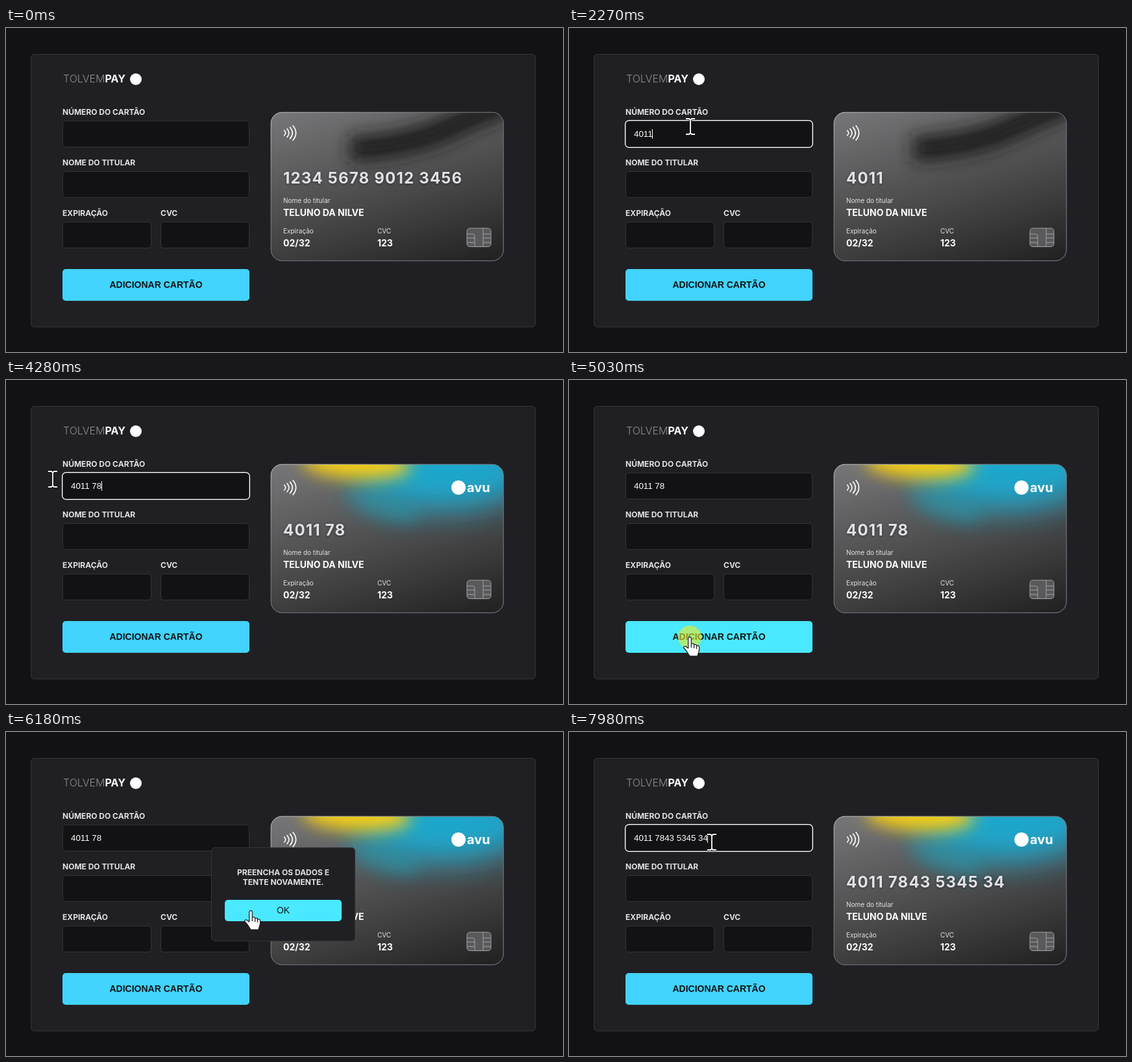
Write an HTML page that moves like this. It is 858x500 px and loops after 8 s.

```html
<!DOCTYPE html>
<html lang="pt-BR">
<head>
<meta charset="utf-8">
<title>Adicionar cartão</title>
<style>
  html, body { margin: 0; width: 100%; height: 100%; overflow: hidden; background: #121214; }
  svg { display: block; width: 100%; height: 100%; }
  text { font-family: Inter, sans-serif; fill: #e1e1e6; white-space: pre; }
  .label { font-size: 12px; font-weight: 700; }
  .small { font-size: 10px; }
  .value { font-size: 14px; font-weight: 700; fill: #fff; }
  .number { font-size: 24px; font-weight: 700; letter-spacing: 1.2px; filter: drop-shadow(0 1px 2px #0006); }
  .control { font-family: "Liberation Sans", Arial, sans-serif; font-size: 14px; fill: #121214; text-anchor: middle; }
  .typed { font-family: "Liberation Sans", Arial, sans-serif; font-size: 13.333px; fill: #fff; }
  .field { fill: #121214; stroke: #323238; }
  .panel { fill: #202024; stroke: #323238; }
  .button { fill: #42d3ff; }
  .button.hover { fill: #4ae9ff; }
  .line { fill: none; stroke: #fff; stroke-width: 1.6; stroke-linecap: round; }
  .pointer { fill: #fff; stroke: #17171a; stroke-width: 1.2; stroke-linejoin: round; }
</style>
</head>
<body>
<svg id="stage" viewBox="0 0 858 500">
  <defs>
    <linearGradient id="metal" gradientUnits="userSpaceOnUse" x1="408" y1="130" x2="505" y2="458">
      <stop stop-color="#777779"/><stop offset=".55" stop-color="#464647"/><stop offset="1" stop-color="#1a1a1b"/>
    </linearGradient>
    <linearGradient id="edge" x1="0" y1="0" x2="1" y2="1">
      <stop stop-color="#c4c4c8"/><stop offset=".3" stop-color="#85858c"/>
      <stop offset=".6" stop-color="#74747c"/><stop offset="1" stop-color="#88888e"/>
    </linearGradient>
    <clipPath id="cardShape"><rect x="408" y="130" width="358.5" height="229.5" rx="17"/></clipPath>
    <filter id="soft" x="-50%" y="-100%" width="200%" height="300%"><feGaussianBlur stdDeviation="13"/></filter>
    <filter id="softer" x="-50%" y="-100%" width="200%" height="300%"><feGaussianBlur stdDeviation="24"/></filter>
  </defs>

  <rect width="858" height="500" fill="#121214"/>
  <rect class="panel" x="38.5" y="40.5" width="777" height="421" rx="5"/>
  <text x="88" y="84" font-size="16" font-weight="300" style="fill:#8d8d93">TOLVEM<tspan font-weight="700" fill="#fff">PAY</tspan></text>
  <circle cx="200" cy="79" r="9" fill="#fff"/>

  <g id="form"></g>
  <rect id="ring" x="86.6" y="142.6" width="288.8" height="41.8" rx="6" fill="none" stroke="#fff" stroke-width="1.3"/>
  <text id="typed" class="typed" x="100" y="168"></text>
  <rect id="caret" y="156" width="1" height="15" fill="#fff"/>
  <rect id="add" class="button" x="87" y="372" width="288" height="49" rx="5"/>
  <text class="control" x="231" y="401" font-weight="700">ADICIONAR CARTÃO</text>

  <g clip-path="url(#cardShape)">
    <rect x="408" y="130" width="359" height="230" fill="url(#metal)"/>
    <path id="shade" d="M530 187Q620 183 680 155T785 112" fill="none" stroke="#1b1b1c" stroke-width="38" filter="url(#soft)"/>
    <g id="glow">
      <ellipse cx="672" cy="138" rx="138" ry="62" fill="#1ba6cb" filter="url(#softer)"/>
      <ellipse cx="582" cy="192" rx="58" ry="24" fill="#2797aa" opacity=".55" transform="rotate(18 582 192)" filter="url(#soft)"/>
      <ellipse cx="540" cy="128" rx="84" ry="25" fill="#f3cb12" transform="rotate(3 540 128)" filter="url(#soft)"/>
    </g>
  </g>
  <rect x="408.2" y="130.2" width="358" height="229" rx="17" fill="none" stroke="url(#edge)"/>
  <g id="waves"></g>
  <g id="brand">
    <circle cx="697" cy="166" r="11" fill="#fff"/>
    <text x="710" y="173" font-size="20" font-weight="700" style="fill:#fff">avu</text>
  </g>
  <text id="number" class="number" x="427" y="240"></text>
  <g id="details"></g>
  <g fill="#59595b" stroke="#a2a2a5">
    <rect x="710" y="309" width="37" height="28.5" rx="4.5"/>
    <path fill="none" d="M710 318H719Q722 318 722 321V337M710 324H722M710 331H722M735 309V337M735 318H747M735 324H747M735 331H747"/>
  </g>

  <g id="modal">
    <rect class="panel" x="316.5" y="178.5" width="221" height="144" rx="5"/>
    <g text-anchor="middle">
      <text class="label" x="427" y="221">PREENCHA OS DADOS E</text>
      <text class="label" x="427" y="236">TENTE NOVAMENTE.</text>
    </g>
    <rect id="ok" class="button" x="337" y="259" width="180" height="33" rx="5"/>
    <text class="control" x="427" y="280">OK</text>
  </g>

  <g id="cursor">
    <circle id="halo" r="18" fill="#f2ee1c" opacity=".58"/>
    <g id="beam" fill="none">
      <path id="beamPath" d="M-7-12H-2L0-10 2-12H7M0-10V10M-7 12H-2L0 10 2 12H7" stroke="#111" stroke-width="3.4"/>
      <use href="#beamPath" style="stroke:#fff"/>
      <path d="M-7-12H-2L0-10 2-12H7M0-10V10M-7 12H-2L0 10 2 12H7" stroke="#fff" stroke-width="1.8"/>
    </g>
    <path id="arrow" class="pointer" d="M0 0V17L4 13.5 7 20 10 18.7 7 12.3H12.3Z"/>
    <path id="hand" class="pointer" d="M-2.3 2A2.3 2.3 0 0 1 2.3 2V10Q6 8.8 6.6 11.5 10 10.4 10.6 13 14.6 12.2 14.6 16V20L12 29H0L-4.5 22-9.5 16Q-9 12.6-5.5 14.6L-2.3 17ZM2.3 10V16M6.6 11.5V17M10.6 13V18"/>
  </g>
</svg>
<script>
const LOOP = 8000, BLINK = 535;
const $ = id => document.getElementById(id);

const field = (label, x, y, width) =>
  `<text class="label" x="${x}" y="${y - 9}">${label}</text>
   <rect class="field" x="${x + .5}" y="${y + .5}" width="${width - 1}" height="40" rx="5"/>`;
const detail = (label, value, x, y) =>
  `<text class="small" x="${x}" y="${y}">${label}</text>
   <text class="value" x="${x}" y="${y + 20}">${value}</text>`;

$('form').innerHTML = field('NÚMERO DO CARTÃO', 87, 143, 288) + field('NOME DO TITULAR', 87, 221, 288) +
  field('EXPIRAÇÃO', 87, 299, 137) + field('CVC', 238, 299, 137);
$('details').innerHTML = detail('Nome do titular', 'TELUNO DA NILVE', 427, 270) +
  detail('Expiração', '02/32', 427, 317) + detail('CVC', '123', 572, 317);
$('waves').innerHTML = [0, 1, 2, 3].map(i => {
  const x = 428.5 + 4.5 * i, h = 4 + 2.4 * i, bulge = 4.4 + 1.6 * i;
  return `<path class="line" d="M${x} ${162 - h}Q${x + bulge} 162 ${x} ${162 + h}"/>`;
}).join('');

// Pointer stops: time, x, y, shape
const moves = [
  [130, 690, 484, 'arrow'], [200, 640, 462, 'arrow'], [270, 570, 425, 'arrow'], [340, 490, 375, 'arrow'],
  [420, 415, 315, 'arrow'], [500, 345, 262, 'arrow'], [580, 285, 212, 'arrow'], [660, 240, 172, 'beam'],
  [730, 208, 150, 'beam'], [800, 192, 147, 'beam'], [880, 187, 153, 'beam'], [1000, 187, 152, 'beam'],
  [4280, 72, 153, 'beam'], [4350, 42, 176, 'arrow'], [4420, 38, 225, 'arrow'], [4480, 48, 275, 'arrow'],
  [4550, 70, 320, 'arrow'], [4620, 100, 358, 'arrow'], [4690, 135, 385, 'hand'], [4750, 163, 395, 'hand'],
  [4820, 180, 397, 'hand'], [4890, 186, 397, 'hand'],
  [5690, 196, 394, 'hand'], [5750, 218, 386, 'arrow'], [5820, 246, 370, 'arrow'], [5890, 281, 347, 'arrow'],
  [5960, 317, 323, 'arrow'], [6030, 347, 303, 'arrow'], [6100, 367, 287, 'hand'], [6180, 377, 276, 'hand'],
  [6250, 380, 276, 'hand'], [6450, 380, 276, 'arrow'], [6520, 372, 268, 'arrow'], [6590, 346, 246, 'beam'],
  [6650, 310, 220, 'arrow'], [6720, 270, 194, 'arrow'], [6790, 238, 178, 'beam'], [6860, 220, 170, 'beam']
].map(([at, x, y, shape]) => [at, { x, y, shape }]);

const type = (at, text) => [at, { text, caretAt: at }];
const events = [
  [880, { focus: true, caretAt: 880 }],
  type(1880, '4'), type(1940, '40'), type(2140, '401'), type(2270, '4011'),
  type(3140, '4011 7'), type(3210, '4011 78'), [3210, { glow: true }], [3600, { brand: true }],
  [5030, { focus: false, halo: true }], [5110, { modal: true }], [5220, { halo: false }],
  [6320, { halo: true }], [6450, { halo: false, modal: false }],
  [6930, { focus: true, caretAt: 6930 }],
  type(7390, '4011 784'), type(7480, '4011 7843'), type(7650, '4011 7843 5'),
  type(7790, '4011 7843 534'), type(7850, '4011 7843 5345'), type(7920, '4011 7843 5345 3'),
  type(7980, '4011 7843 5345 34')
];
const steps = [...moves, ...events].sort((a, b) => a[0] - b[0]);

const show = (id, on) => $(id).style.display = on ? '' : 'none';

function render(t) {
  const s = { text: '', caretAt: 0 };
  for (const [at, change] of steps) if (at <= t) Object.assign(s, change);

  $('typed').textContent = s.text;
  $('number').textContent = s.text || '1234 5678 9012 3456';
  show('ring', s.focus);
  show('caret', s.focus && Math.floor((t - s.caretAt) / BLINK) % 2 === 0);
  $('caret').setAttribute('x', Math.floor(100 + (s.text ? $('typed').getComputedTextLength() : 0)));

  show('shade', !s.glow);
  show('glow', s.glow);
  show('brand', s.brand);
  $('waves').setAttribute('transform', `translate(0 ${s.brand ? 4 : 0})`);
  show('modal', s.modal);

  const hovering = s.shape === 'hand';
  const overOk = hovering && s.y < 300;
  $('ok').classList.toggle('hover', overOk);
  $('add').classList.toggle('hover', hovering && !overOk);
  show('cursor', s.shape);
  show('halo', s.halo);
  for (const shape of ['arrow', 'beam', 'hand']) show(shape, s.shape === shape);
  if (s.shape) $('cursor').setAttribute('transform', `translate(${s.x} ${s.y})`);
}

const start = performance.now();
function frame() {
  render((performance.now() - start) % LOOP);
  requestAnimationFrame(frame);
}
render(0);
requestAnimationFrame(frame);
</script>
</body>
</html>
```
